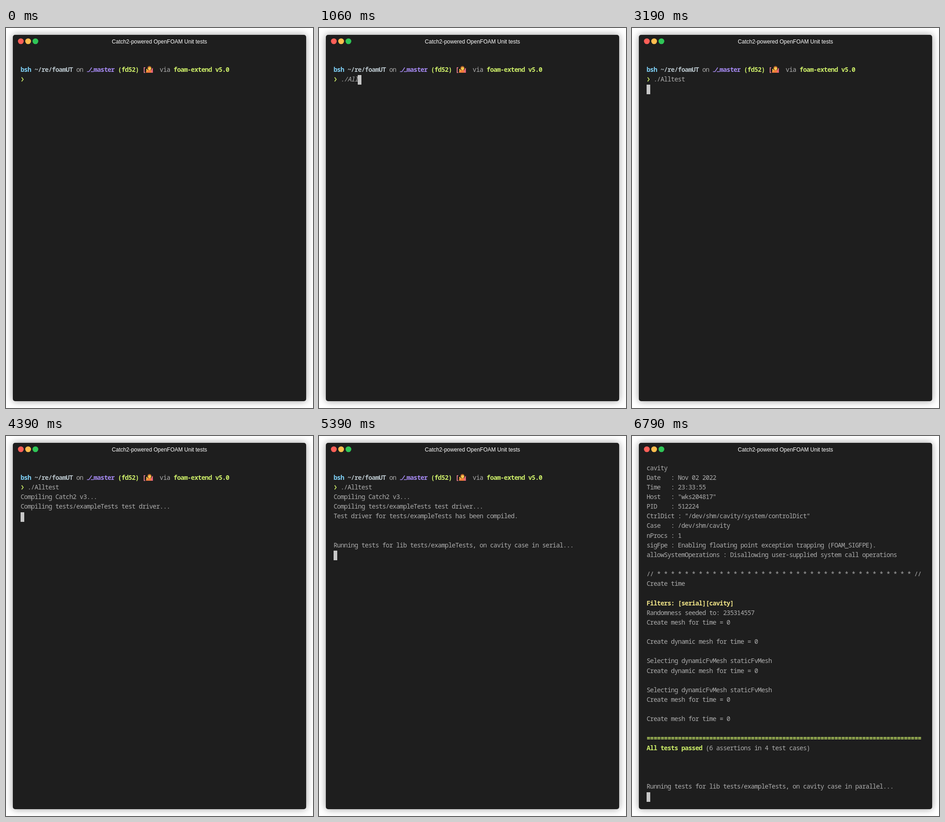
Animation of 673 by 832 pixels, one loop 8 s. Source, as an HTML page:

```html
<!DOCTYPE html>
<html lang="en">
<head>
<meta charset="utf-8">
<title>Unit tests in a terminal</title>
<style>
  html, body { margin: 0; width: 100%; height: 100%; overflow: hidden; background: #fff; }
  .window {
    position: absolute; left: 15px; top: 15px; width: 643px; height: 802px;
    border-radius: 5px; background: #1e1e1e; box-shadow: 0 0 16px rgba(0, 0, 0, .4);
  }
  svg { position: absolute; left: 0; top: 0; display: block; }
  .title { font: 12px "Liberation Sans", Arial, sans-serif; fill: #fff; text-anchor: middle; }
  .term text {
    font: 300 14px "Noto Sans Mono", "DejaVu Sans Mono", monospace;
    letter-spacing: -.78px; white-space: pre; fill: #adadad;
  }
  .term .cyan, .term .path, .term .violet, .term .green, .term .pink, .term .yellow { font-weight: 700; }
  .term .cyan { fill: #7fd1f7; }
  .term .path { fill: #b7c3c9; }
  .term .violet { fill: #a68af3; }
  .term .green { fill: #cdee69; }
  .term .pink { fill: #f08097; }
  .term .yellow { fill: #efe387; }
  .term .typed { font-style: italic; }
</style>
</head>
<body>
<div class="window"></div>
<svg width="673" height="832" viewBox="0 0 673 832">
  <circle cx="32.5" cy="29" r="6.3" fill="#ff5f58"/>
  <circle cx="48.5" cy="29" r="6.3" fill="#ffbd4e"/>
  <circle cx="64.5" cy="29" r="6.3" fill="#2fc657"/>
  <text class="title" x="336.5" y="34">Catch2-powered OpenFOAM Unit tests</text>
  <g class="term">
    <g id="marks" fill="none">
      <path d="M177.5 95.5h4.5l6-9M186 95.5h6" stroke="#a68af3" stroke-width="1.6"/>
      <path d="M34.3 108l3.4 4.5-3.4 4.5" stroke="#cdee69" stroke-width="1.7"/>
      <path d="M307 98q-1-6 4-6h7q5 0 4 6z" fill="#ee7a3c"/>
      <path d="M319 90l3-3v11h-4z" fill="#e4657c"/>
      <path d="M307 91l2-2 3 5-3 2z" fill="#f4b13c"/>
      <circle cx="314.5" cy="87.6" r="4.4" fill="#b5622b"/>
      <circle cx="314.8" cy="89" r="3.3" fill="#fbc84a"/>
    </g>
    <g id="lines"></g>
    <rect id="cursor" width="8" height="21" fill="#c7c7c7"/>
  </g>
</svg>
<script>
const LOOP = 8000, LEFT = 32, CELL = 7.62, ROW = 21.14;
const $ = id => document.getElementById(id);
const run = (style, text, col = 0) => ({ style, text, col });

const prompt = [
  run('cyan', 'bsh'), run('path', '~/re/foamUT', 4), run('', 'on', 16),
  run('violet', 'master', 21), run('green', '(fd52)', 28), run('pink', '[', 35),
  run('', 'via', 40), run('green', 'foam-extend v5.0', 44)
];
const command = (text, style = 'typed') => ['', prompt, [run(style, text, 2)]];
const running = mode => `Running tests for lib tests/exampleTests, on cavity case in ${mode}...`;

const entered = command('./Alltest', '');
const compiling = [...entered, 'Compiling Catch2 v3...', 'Compiling tests/exampleTests test driver...'];
const compiled = [...compiling, 'Test driver for tests/exampleTests has been compiled.'];
const mesh = 'Create mesh for time = 0';
const dynamic = 'Create dynamic mesh for time = 0';
const selecting = 'Selecting dynamicFvMesh staticFvMesh';
const report = [
  '\\*' + '-'.repeat(75) + '*/',
  'Build  : 5.0-4fabd3cccb9b',
  'Exec   : /home/korvan/repos/foamUT/tests/exampleTests/testDriver -case /dev/shm/',
  'cavity',
  'Date   : Nov 02 2022',
  'Time   : 23:33:55',
  'Host   : "wks204817"',
  'PID    : 512224',
  'CtrlDict : "/dev/shm/cavity/system/controlDict"',
  'Case   : /dev/shm/cavity',
  'nProcs : 1',
  'sigFpe : Enabling floating point exception trapping (FOAM_SIGFPE).',
  'allowSystemOperations : Disallowing user-supplied system call operations',
  '',
  '// ' + '* '.repeat(37) + '//',
  'Create time',
  '',
  [run('yellow', 'Filters: [serial][cavity]')],
  'Randomness seeded to: 235314557',
  mesh, '', dynamic, '', selecting, dynamic, '', selecting, mesh, '', mesh, '',
  [run('green', '='.repeat(79))],
  [run('green', 'All tests passed'), run('', '(6 assertions in 4 test cases)', 17)],
  ''
];

// Typing leaves the cursor on the command row; output puts it on the next row.
const typed = (at, text) => ({ at, lines: command(text), row: 2, col: 2 + text.length, prompt: true });
const printed = (at, lines, prompt = true) => ({ at, lines, row: lines.length, col: 0, prompt });
const steps = [
  { at: 0, lines: command(''), prompt: true },
  typed(300, '.'), typed(480, './'), typed(650, './A'), typed(920, './Al'), typed(1060, './All'),
  typed(2460, './Allt'), typed(2700, './Allte'), typed(2790, './Alltest'),
  printed(3190, entered),
  printed(4390, compiling),
  printed(4890, compiled),
  printed(5390, [...compiled, '', '', running('serial')]),
  printed(6290, report, false),
  printed(6790, [...report.slice(3), '', '', running('parallel')], false)
];

function drawLine(line, row) {
  const runs = typeof line === 'string' ? [run('', line)] : line;
  return runs.map(r => {
    const x = LEFT + r.col * CELL, y = 74.6 + row * ROW;
    return `<text class="${r.style}" x="${x}" y="${y}">${r.text}</text>`;
  }).join('');
}

function draw(step) {
  $('lines').innerHTML = step.lines.map(drawLine).join('');
  $('marks').style.display = step.prompt ? '' : 'none';
  const cursor = $('cursor'), shown = step.row !== undefined;
  cursor.style.display = shown ? '' : 'none';
  if (shown) {
    cursor.setAttribute('x', Math.round(LEFT + step.col * CELL));
    cursor.setAttribute('y', Math.round(60.8 + step.row * ROW));
  }
}

let current;
const start = performance.now();
function tick() {
  const t = (performance.now() - start) % LOOP;
  const step = steps.filter(s => s.at <= t).pop();
  if (step !== current) draw(current = step);
  requestAnimationFrame(tick);
}
tick();
</script>
</body>
</html>
```
